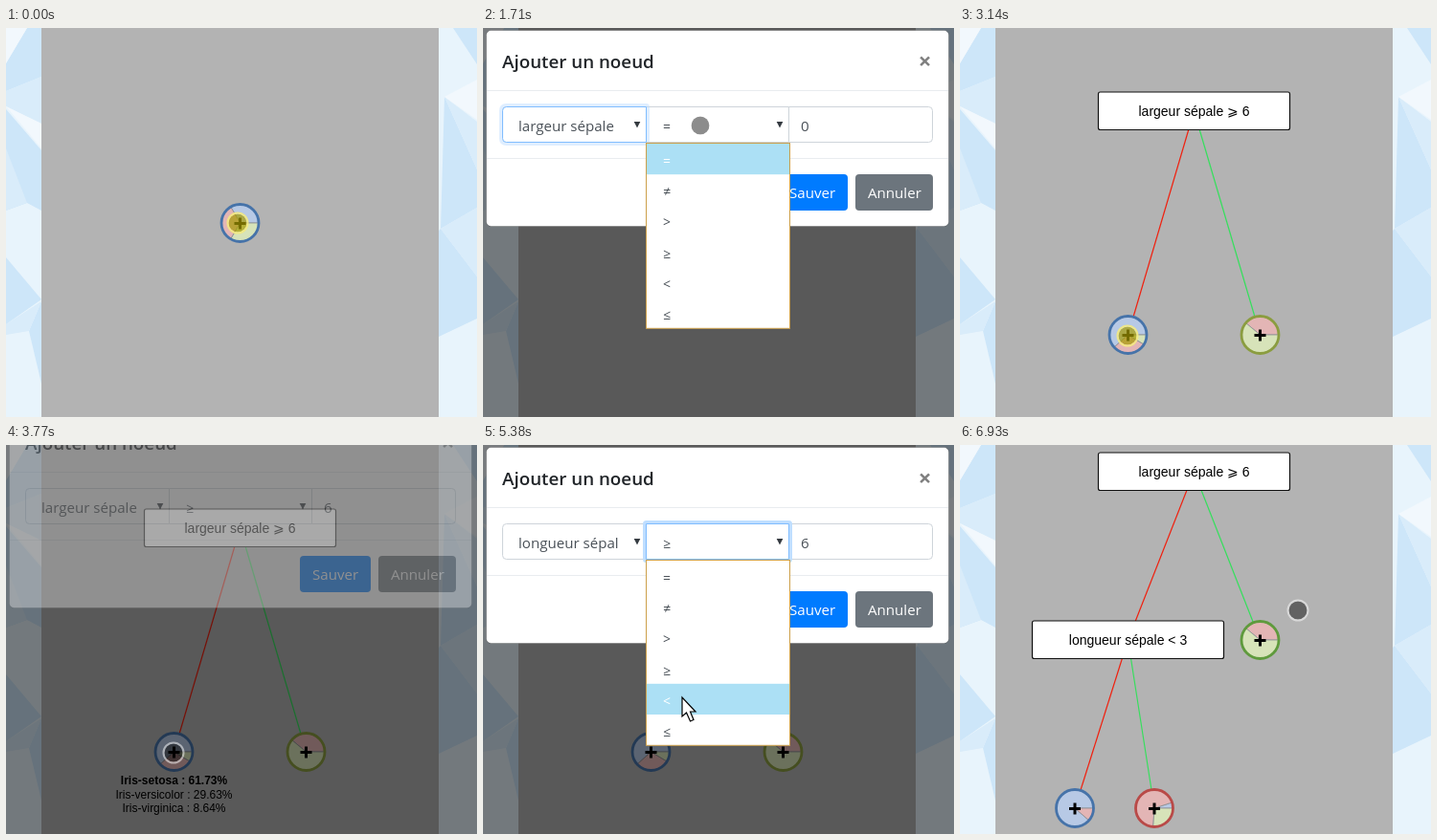
Recreate the animation shown at these times as an HTML page. Size 492 px wide and 407 px high, loop 7.26 s.

```html
<!DOCTYPE html>
<html lang="fr">
<head>
<meta charset="utf-8">
<title>Ajouter un noeud</title>
<style>
  html, body { margin: 0; width: 100%; height: 100%; overflow: hidden; }
  svg { display: block; width: 492px; height: 407px; }
  .ui { font: 15.1px "Open Sans", "Noto Sans", sans-serif; fill: #495057; }
  .title { font-size: 18.8px; font-weight: 600; fill: #212529; }
  .close { font-size: 24px; font-weight: 700; fill: #7f7f7f; text-anchor: middle; }
  .btn { fill: #fff; }
  .tree { font: 14px "Liberation Sans", Arial, sans-serif; text-anchor: middle; }
  .tip { font-size: 12px; }
</style>
</head>
<body>
<svg viewBox="0 0 492 407">
  <clipPath id="label"><rect x="37" y="84" width="104" height="34"/></clipPath>
  <g id="backdrop">
    <rect width="492" height="407" fill="#e8f4fc"/>
    <path fill="#cde6f9" d="M22 0H37V51L0 66V37ZM0 85L37 128V191L22 183L0 191ZM0 240L37 284L0 310ZM37 286V372L24 317Z"/>
    <path fill="#d9ecfa" d="M0 126L22 183L0 191ZM0 66L37 51V100L0 82ZM0 310L37 286L24 317L0 321Z"/>
    <path fill="#f2f8fd" d="M0 82L37 100V126ZM0 0H22L0 37Z"/>
    <path fill="#cde6f9" d="M467 0H492V38ZM458 72L492 148V188L454 210ZM454 210L492 260V304L452 323V212Z"/>
    <path fill="#d9ecfa" d="M458 72L492 98V148ZM454 210L492 188V260Z"/>
    <path fill="#f2f8fd" d="M458 72L492 54V96Z"/>
    <rect x="37" width="415" height="407" fill="#b3b3b3"/>
  </g>
  <g id="scene"></g>
</svg>
<script>
const LOOP = 7260;
const SPECIES = ['Iris-setosa', 'Iris-versicolor', 'Iris-virginica'];
const FILLS = ['#b7c9e5', '#e3b5b5', '#d7e3b9'];
const RINGS = ['#4673a9', '#b94a48', '#8b9d40'];
const FIELDS = ['largeur sépale', 'longueur sépale'];
const OPS = ['=', '≠', '>', '≥', '<', '≤'];

const node = (x, y, shares, main, ring = RINGS[main]) => ({ x, y, shares, main, ring });
const rule = (x, y, label) => ({ x, y, label });
const link = (from, to, color) => ({ from, to, color });
const RED = '#f0200f', GREEN = '#35e05c';

const makeTree = (nodes, rules, links) => ({ nodes, rules, links });
const split = (parent, no, yes) => [link(parent, no, RED), link(parent, yes, GREEN)];

const TREES = [0, 1, 2].map(depth => {
  if (!depth) return makeTree([node(244.5, 204, [1 / 3, 1 / 3, 1 / 3], 0)], [], []);
  const root = rule(244.5, depth === 1 ? 87 : 28, 'largeur sépale ⩾ 6');
  const big = [0, 0.39, 0.61];
  if (depth === 1) {
    const left = node(175.5, 321, [0.6173, 0.2963, 0.0864], 0);
    const right = node(313.5, 321, big, 2);
    return makeTree([left, right], [root], split(root, left, right));
  }
  const right = node(313.5, 204, big, 2, '#5f9a3d');
  const sub = rule(175.5, 204, 'longueur sépale < 3');
  const a = node(120, 380, [0.886, 0.114, 0], 0);
  const b = node(203, 380, [0.05, 0.69, 0.26], 1);
  return makeTree([right, a, b], [root, sub], [...split(root, sub, right), ...split(sub, a, b)]);
});

// Each cue patches the state from its time onwards.
const at = (x, y, cursor = 'touch') => ({ x, y, cursor });
const closing = { modal: 0.2, dy: -25 };
const opening = { modal: 0.33, dy: -37, shade: 0.5 };
const CUES = [
  [0, { tree: 0, tip: 0, shade: 0, modal: 0, dy: 0, field: 0, op: 0, value: '0',
        focus: -1, glow: 1, open: -1, hover: 0, ...at(242, 204, 'press') }],
  [170, { tip: 1, cursor: 'touch' }],
  [330, { shade: 0.17 }],
  [480, opening],
  [650, { modal: 1, dy: -4 }],
  [800, { dy: 0, ...at(228, 190) }],
  [950, { tip: 0, ...at(175, 150) }],
  [1110, at(110, 106)],
  [1260, { focus: 0, open: 0, ...at(105, 103) }],
  [1420, at(106, 138, 'arrow')],
  [1570, { open: -1, ...at(165, 103) }],
  [1710, { open: 1, glow: 0.5, ...at(227, 102) }],
  [1860, { focus: 1, glow: 1, hover: 1, ...at(216, 170, 'arrow') }],
  [2020, { hover: 3, ...at(208, 234, 'arrow') }],
  [2200, { op: 3, open: -1, ...at(364, 104) }],
  [2360, { focus: 2, value: '6', ...at(356, 130) }],
  [2520, { tree: 1, ...at(350, 173) }],
  [2680, closing],
  [2830, { modal: 0, ...at(290, 230) }],
  [2990, { shade: 0.25, ...at(210, 296) }],
  [3140, { shade: 0, focus: -1, ...at(175, 322, 'press') }],
  [3300, { tip: 1, cursor: 'touch' }],
  [3460, { shade: 0.17 }],
  [3620, opening],
  [3780, { modal: 1, dy: -4 }],
  [3930, { dy: 0, ...at(170, 290) }],
  [4090, { tip: 0, ...at(150, 210) }],
  [4240, at(122, 130)],
  [4400, { focus: 0, ...at(110, 104) }],
  [4560, { open: 0, hover: 0, ...at(108, 170, 'arrow') }],
  [4720, { hover: 1 }],
  [4880, { field: 1, open: -1, ...at(150, 110) }],
  [5030, { focus: 1, open: 1, hover: 3, ...at(228, 103) }],
  [5200, at(214, 200, 'arrow')],
  [5360, { hover: 4, ...at(208, 264, 'arrow') }],
  [5540, { op: 4, open: -1, ...at(308, 108) }],
  [5700, { focus: 2, ...at(350, 104) }],
  [5860, { value: '' }],
  [6000, { value: '3' }],
  [6150, at(353, 140)],
  [6310, { tree: 2, ...at(353, 173) }],
  [6470, closing],
  [6630, { modal: 0 }],
  [6770, { shade: 0.25 }],
  [6930, { shade: 0, focus: -1 }],
];
let last = {};
const STATES = CUES.map(([time, patch]) => (last = { ...last, ...patch, time }));

const escape = s => s.replace(/</g, '&lt;');
const text = (x, y, s, attrs = '') => `<text x="${x}" y="${y}" ${attrs}>${escape(s)}</text>`;
const rect = (x, y, w, h, attrs) => `<rect x="${x}" y="${y}" width="${w}" height="${h}" ${attrs}/>`;

function pie({ x, y, shares, ring }) {
  const r = 19.5;
  const point = share => {
    const angle = share * 2 * Math.PI;
    return `${x + r * Math.cos(angle)} ${y - r * Math.sin(angle)}`;
  };
  let start = 0;
  const slices = shares.map((share, i) => {
    const d = `M${x} ${y}L${point(start)}A${r} ${r} 0 ${+(share > 0.5)} 0 ${point(start + share)}Z`;
    start += share;
    return share ? `<path d="${d}" fill="${FILLS[i]}" stroke="#8b8f94" stroke-width=".8"/>` : '';
  });
  return slices.join('') +
    `<circle cx="${x}" cy="${y}" r="${r}" fill="none" stroke="${ring}" stroke-width="2.8"/>` +
    `<path d="M${x - 6} ${y + 0.5}h12m-6 -6v12" stroke="#000" stroke-width="3"/>`;
}

function tooltip({ x, y, shares, main }) {
  return shares.map((share, i) =>
    text(x, y + 34 + i * 14.5, `${SPECIES[i]} : ${(share * 100).toFixed(2)}%`,
      `class="tip" ${i === main ? 'font-weight="700"' : ''}`)).join('');
}

function drawTree(s) {
  const { nodes, rules, links } = TREES[s.tree];
  return '<g class="tree">' +
    links.map(({ from, to, color }) =>
      `<path d="M${from.x} ${from.y}L${to.x} ${to.y}" stroke="${color}" stroke-width="1.2"/>`).join('') +
    nodes.map(pie).join('') +
    rules.map(({ x, y, label }) =>
      rect(x - 100, y - 20, 200, 39.5, 'rx="2" fill="#fff" stroke="#111" stroke-width="1.2"') +
      text(x, y + 4.5, label)).join('') +
    (s.tip ? tooltip(nodes[0]) : '') + '</g>';
}

// Rounded on the outer ends of the three-part input group only.
function boxPath(i) {
  const x = [20.5, 170.5, 319.5][i];
  if (i === 0) return `M${x + 150} 82.5V119.5H${x + 4}q-4 0-4-4V86.5q0-4 4-4Z`;
  if (i === 1) return `M${x} 82.5h149v37h-149Z`;
  return `M${x} 82.5h146q4 0 4 4v29q0 4-4 4h-146Z`;
}

function drawFields(s) {
  const box = (i, attrs) => `<path d="${boxPath(i)}" ${attrs}/>`;
  const caret = x => `<path d="M${x - 3.3} 98h6.6l-3.3 6.5Z" fill="#343a40"/>`;
  const focus = s.focus < 0 ? '' :
    box(s.focus, `fill="none" stroke="#bfdeff" stroke-width="7" stroke-linejoin="round" opacity="${s.glow}"`) +
    box(s.focus, 'fill="#fff" stroke="#80bdff"');
  return [0, 1, 2].map(i => box(i, 'fill="#fff" stroke="#ced4da"')).join('') + focus +
    text(37, 108, FIELDS[s.field], 'clip-path="url(#label)"') + caret(161) +
    text(188, 108, OPS[s.op], 'font-size="14"') + caret(310) + text(332, 108, s.value);
}

function drawList(s) {
  if (s.open < 0) return '';
  const [items, x, tx, size] = s.open ? [OPS, 170.5, 188, 14] : [FIELDS, 20.5, 37, 15.1];
  const rowHeight = 32.2;
  return rect(x, 120.5, 150, items.length * rowHeight + 0.6, 'fill="#fff" stroke="#cda04a"') +
    rect(x + 0.5, 121 + s.hover * rowHeight, 149, rowHeight, 'fill="#ace0f5"') +
    items.map((item, i) => text(tx, 144 + i * rowHeight, item,
      `font-size="${size}" ${i === s.hover ? 'fill="#fff"' : ''}`)).join('');
}

function drawModal(s) {
  if (!s.modal) return '';
  return `<g class="ui" opacity="${s.modal}" transform="translate(0 ${s.dy})">` +
    rect(3.5, 2.5, 483, 205, 'rx="5" fill="#fff" stroke="#000" stroke-opacity=".2"') +
    '<path d="M4 65.5H486M4 136.5H486" stroke="#e9ecef"/>' +
    text(20, 42, 'Ajouter un noeud', 'class="title"') +
    text(461.5, 42.6, '×', 'class="close"') +
    rect(307, 153, 74, 38, 'rx="4" fill="#007bff"') +
    rect(389, 153, 81, 38, 'rx="4" fill="#6c757d"') +
    text(320, 178, 'Sauver', 'class="btn"') + text(402, 178, 'Annuler', 'class="btn"') +
    drawFields(s) + drawList(s) + '</g>';
}

function drawCursor({ x, y, cursor }) {
  if (cursor === 'arrow') {
    return `<path transform="translate(${x} ${y})" d="M0 0V20L4.5 16L8.5 25L12 23.5L8.5 15H14Z" fill="#fff" stroke="#000" stroke-width="1.2"/>`;
  }
  const [fill, alpha, ring] = cursor === 'press' ? ['#a59a00', 0.7, '#f4ea80'] : ['#000', 0.45, '#fff'];
  return `<circle cx="${x}" cy="${y}" r="9.5" fill="${fill}" fill-opacity="${alpha}"/>` +
    `<circle cx="${x}" cy="${y}" r="10.5" fill="none" stroke="${ring}" stroke-width="2" ` +
    `stroke-opacity="${cursor === 'press' ? 0.9 : 0.5}"/>`;
}

const scene = document.getElementById('scene');
let shown;
function render(now) {
  const t = now % LOOP;
  const state = STATES.findLast(s => s.time <= t);
  if (state !== shown) {
    shown = state;
    scene.innerHTML = drawTree(state) +
      rect(0, 0, 492, 407, `fill-opacity="${state.shade}"`) +
      drawModal(state) + drawCursor(state);
  }
}

const start = performance.now();
function loop() {
  render(performance.now() - start);
  requestAnimationFrame(loop);
}
loop();
</script>
</body>
</html>
```
